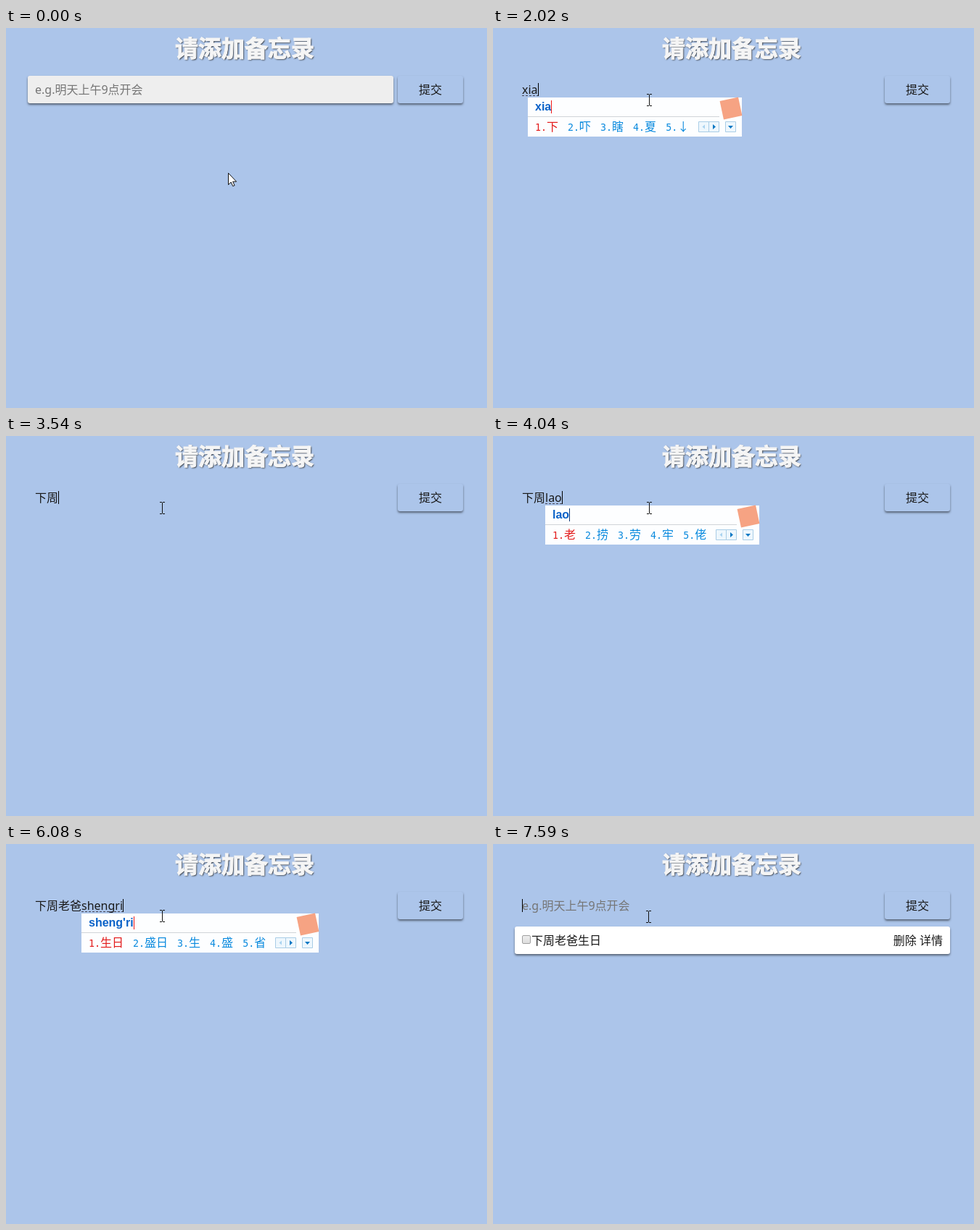
Animation of 663 by 525 pixels, one loop 8 s. Source, as an HTML page:

```html
<!DOCTYPE html>
<html lang="zh-CN">
<head>
<meta charset="utf-8">
<title>备忘录</title>
<style>
  html, body { margin: 0; width: 100%; height: 100%; overflow: hidden; }
  body {
    position: relative; background: #acc5ea; color: #1a1a1a; white-space: nowrap;
    font: 16px/18px "Noto Sans", "Noto Sans CJK SC", "Noto Sans CJK", sans-serif;
  }
  [hidden] { display: none !important; }
  h1 {
    position: absolute; left: 0; top: 0; width: 658px; margin: 0; text-align: center;
    font-size: 32px; line-height: 56px; font-weight: bold;
    color: #f5f5f5; -webkit-text-stroke: 1px #f5f5f5; text-shadow: 1px 1px 2px #222;
  }
  .box {
    position: absolute; box-sizing: border-box; left: 30px; top: 66px; height: 38px;
    padding: 0 10px; display: flex; align-items: center; border-radius: 3px;
  }
  .raised { box-shadow: 0 2px 3px rgba(0, 0, 0, .5); }
  #field { width: 504px; }
  #submit { left: 540px; width: 90px; justify-content: center; }
  #item { top: 114px; width: 600px; background: #fff; }
  #item b { margin-left: auto; font-weight: normal; }
  #item i {
    box-sizing: border-box; width: 12px; height: 12px; margin: -2px 1px 0 0;
    border: 1px solid #a0a0a0; border-radius: 2px; background: linear-gradient(#eee, #ddd);
  }
  #hint { color: #757575; }
  #comp { position: relative; }
  #comp::after {
    content: ""; position: absolute; left: 0; right: 0; bottom: 0; height: 1px;
    background: repeating-linear-gradient(90deg, #445 0 3px, transparent 3px 5px);
  }
  .caret { width: 1px; height: 18px; margin-right: -1px; background: #000; }
  #ime { position: absolute; top: 96px; height: 54px; background: #fdfeff; }
  .row { display: flex; align-items: center; height: 27px; padding-left: 10px; color: #0a8ade; }
  .row.top {
    box-sizing: border-box; margin-right: 31px; border-bottom: 1px solid #d0d4d8;
    font: bold 16px/18px "Liberation Sans", Arial, sans-serif; color: #0a62c8;
  }
  #list { display: flex; }
  #list span { margin-right: 13px; font-family: "Noto Sans CJK SC", "Noto Sans CJK", sans-serif; font-weight: 300; }
  #list span:first-child { color: #e31b1b; }
  #list b { font: 13.3px/18px "DejaVu Sans Mono", monospace; }
  #badge {
    position: absolute; right: 2px; top: 2px; width: 26px; height: 26px;
    background: #f6a383; transform: rotate(-12deg);
  }
  svg { display: block; }
  #arrow, #beam { position: absolute; }
  #arrow { left: 306px; top: 200px; }
</style>
</head>
<body>
<h1>请添加备忘录</h1>
<div class="box" id="field"><span id="done"></span><span id="comp"></span><i class="caret" id="caret"></i><span id="hint">e.g.明天上午9点开会</span></div>
<div class="box raised" id="submit">提交</div>
<div class="box raised" id="item"><i></i><span>下周老爸生日</span><b>删除 详情</b></div>
<div id="ime">
  <div class="row top"><span id="typed"></span><i class="caret" id="imeCaret"></i></div>
  <div class="row"><span id="list"></span><svg width="60" height="15">
    <path d="M.5 .5h14v14h-14zM14.5 .5h14v14h-14zM37.5 .5h14v14h-14z" fill="#eef7fd" stroke="#a9cde6"/>
    <path d="M9 4.500v6l-3.500-3z" fill="#a9d3f0"/>
    <path d="M20 4v7l4-3.500zM41 6h7l-3.500 4z" fill="#0b78c4"/>
  </svg></div>
  <div id="badge"></div>
</div>
<svg id="arrow" width="13" height="20"><path d="M.5 .5v16l3.700-3.500 2.500 5.500 2.400-1-2.500-5.300h5z" fill="#fff" stroke="#111"/></svg>
<svg id="beam" width="7" height="17"><path d="M0 .5h3M4 .5h3M3.500 1v15M0 16.500h3M4 16.500h3" fill="none" stroke="#111"/></svg>
<script>
const LOOP = 8000;
const RED = '#f01818', NAVY = '#123a78';
const $ = id => document.getElementById(id);
const ime = (x, typed, list, color) => ({ x, typed, list: list.split(' '), color });

// Each step holds until the next one begins.
const steps = [
  { t: 0, bg: '#eee', arrow: true },
  { t: 500, bg: '#b4c8ea' },
  { t: 1020, caret: true },
  { t: 1500 },
  { t: 2020, comp: 'xia', caret: true, ime: ime(48, 'xia', '下 吓 瞎 夏 ↓', RED) },
  { t: 2520, comp: 'xia', ime: ime(48, "xia'z", '下载 下在 瞎子 夏至 下周', RED) },
  { t: 3050, comp: 'xiazhou', caret: true, ime: ime(48, "xia'zhou", '下周 瞎诌 虾粥 峡州 下轴', NAVY) },
  { t: 3540, done: '下周', caret: true },
  { t: 4040, done: '下周', comp: 'lao', caret: true, ime: ime(72, 'lao', '老 捞 劳 牢 佬', NAVY) },
  { t: 4540, done: '下周', comp: 'laoba', caret: true, ime: ime(72, "lao'ba", '老爸 老吧 老八 老把 捞吧', RED) },
  { t: 5060, done: '下周老爸', caret: true, ime: ime(104, 's', '是 说 上 时 所', RED) },
  { t: 5560, done: '下周老爸', comp: 'sheng', caret: true, ime: ime(104, 'sheng', '生 声 省 升 圣', NAVY) },
  { t: 6080, done: '下周老爸', comp: 'shengri', caret: true, ime: ime(104, "sheng'ri", '生日 盛日 生 盛 省', RED) },
  { t: 6580, item: true, caret: true },
  { t: 7100, item: true, moved: true },
  { t: 7590, item: true, moved: true, caret: true }
];

function show(s) {
  $('field').style.background = s.bg || 'none';
  $('field').classList.toggle('raised', !!s.arrow);
  $('done').textContent = s.done || '';
  $('comp').textContent = s.comp || '';
  $('caret').hidden = !s.caret;
  $('hint').hidden = !!(s.done || s.comp);
  $('item').hidden = !s.item;
  $('arrow').style.display = s.arrow ? 'block' : 'none';
  $('beam').style.display = s.arrow ? 'none' : 'block';
  $('beam').style.left = (s.moved ? 211 : 212) + 'px';
  $('beam').style.top = (s.moved ? 92 : 91) + 'px';
  $('ime').hidden = !s.ime;
  if (!s.ime) return;
  $('ime').style.left = s.ime.x + 'px';
  $('typed').textContent = s.ime.typed;
  $('imeCaret').style.background = s.ime.color;
  $('list').innerHTML = s.ime.list.map((w, i) => `<span><b>${i + 1}.</b>${w}</span>`).join('');
}

let current;
function tick() {
  const t = performance.now() % LOOP;
  const step = steps.findLast(s => s.t <= t);
  if (step !== current) show(current = step);
  requestAnimationFrame(tick);
}
tick();
</script>
</body>
</html>
```
